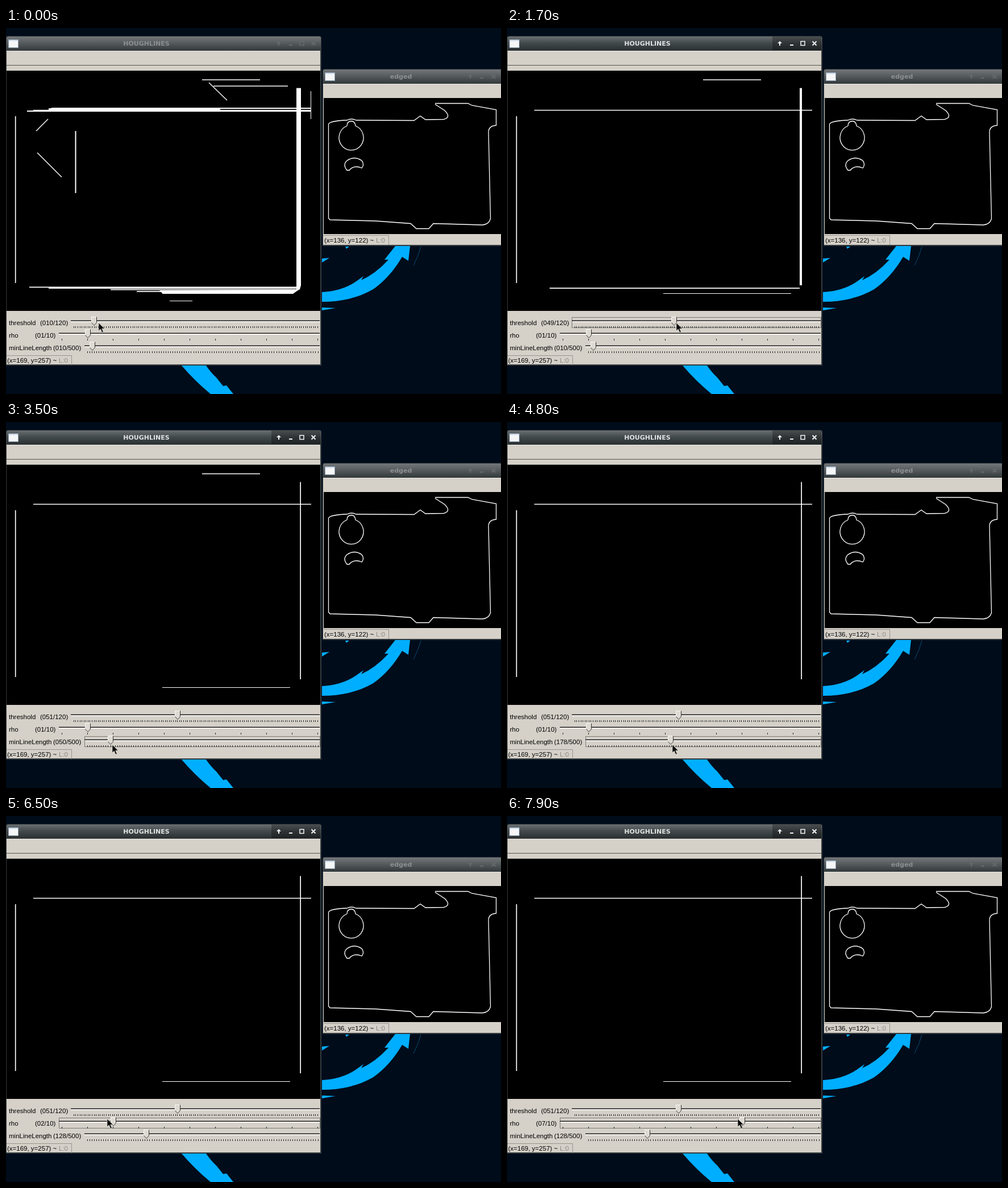
Animation of 871 by 643 pixels, one loop 8000 ms. Source, as an HTML page with a canvas:

```html
<!DOCTYPE html>
<html lang="en">
<head>
<meta charset="utf-8">
<title>Hough lines tuning</title>
<style>
html, body { margin: 0; width: 871px; height: 643px; overflow: hidden; background: #010c1b; }
canvas { display: block; }
</style>
</head>
<body>
<canvas id="stage" width="871" height="643"></canvas>
<script>
const ctx = document.getElementById('stage').getContext('2d');
const PANEL = '#d5d0c8', BLUE = '#00aeff';
const LABEL = '11.5px "Liberation Sans", Arial, sans-serif';
const TITLE = 'bold 11px "DejaVu Sans", sans-serif';

const clamp = (v, lo, hi) => Math.min(hi, Math.max(lo, v));
const mix = (a, b, u) => a + (b - a) * u;

function rect(x, y, w, h, color) {
  ctx.fillStyle = color;
  ctx.fillRect(x, y, w, h);
}
function text(str, x, y, color = '#000', font = LABEL, align = 'left') {
  ctx.font = font;
  ctx.textAlign = align;
  ctx.fillStyle = color;
  ctx.fillText(str, x, y);
}
function shape(d, fill, stroke, width = 1) {
  const p = new Path2D(d);
  if (fill) { ctx.fillStyle = fill; ctx.fill(p); }
  if (stroke) { ctx.strokeStyle = stroke; ctx.lineWidth = width; ctx.stroke(p); }
}

// Times are in steps of 100 ms. Each bar is dragged from `start` along its keys [step, value];
// the pointer glides to it during `reach` and holds it at `grip` from the handle.
const BARS = [
  { name: 'threshold', max: 120, digits: 3, y: 514, left: 114, zero: 119.2, unit: 3.577, tick: 1, textX: 60,
    start: 6, reach: [0, 1], grip: [4, 4], keys: [[6.5, 10], [17, 49], [19, 51]] },
  { name: 'minLineLength', max: 500, digits: 3, y: 558, left: 138, zero: 143.4, unit: 0.811, tick: 5, textX: 83,
    start: 32, reach: [27, 29], grip: [3, 9], keys: [[32, 10], [39, 103], [40, 103], [44, 178], [48, 178], [51, 128]] },
  { name: 'rho', max: 10, digits: 2, y: 536, left: 93, zero: 98.5, unit: 45, tick: 1, textX: 51,
    start: 62, reach: [53, 58], grip: [-8, -4], keys: [[62, 1.2], [65, 1.95], [77, 7]] }
];

function valueAt({ keys }, s) {
  let a = keys[0];
  for (const b of keys) {
    if (s < b[0]) return mix(a[1], b[1], clamp((s - a[0]) / (b[0] - a[0]), 0, 1));
    a = b;
  }
  return a[1];
}
const handleX = (bar, value) => Math.round(bar.zero + value * bar.unit);
const activeBar = s => BARS.findLast(bar => s >= bar.start);

function pointer(s) {
  let x = 163, y = 518;
  for (const bar of BARS) {
    const [from, to] = bar.reach;
    const u = clamp((s - from) / (to - from), 0, 1);
    x = mix(x, handleX(bar, valueAt(bar, s)) + bar.grip[0], u);
    y = mix(y, bar.y + bar.grip[1], u);
  }
  return [Math.round(x), Math.round(y)];
}

function houghLines(th, min, rho) {
  // a line shows when it has enough votes and is long enough
  const line = (x1, y1, x2, y2, votes = 99, width = 1.7) => {
    if (votes >= th && Math.hypot(x2 - x1, y2 - y1) * 0.73 >= min)
      shape(`M${x1} ${y1}L${x2} ${y2}`, null, '#fff', width);
  };
  line(345, 91, 447, 91);
  line(365, 102, 496, 102, 14);
  line(357, 96, 389, 127, 12, 1.4);
  line(53, 181, 74, 160, 12, 1.4);
  line(55, 219, 98, 262, 12, 1.4);
  line(122.5, 181, 122.5, 290, 14, 2);

  line(48, 144.5, 537, 144.5);
  line(37, 146, 537, 146, 43, 2);
  line(75, 142.5, 377, 142.5, 16, 3);
  line(80, 141, 537, 141, 16, 2);
  line(16.7, 155, 16.7, 448);
  line(536.5, 111, 536.5, 160, 27, 1);

  const band = th > 50 ? 1.7 : clamp(18 - th, 4, 8);
  line(519 - band / 2, 105.5, 519 - band / 2, 452, 99, band);

  const starts = [41, 75, 184, 230, 275], votes = [33, 50, 30, 26, 99];
  starts.forEach((x, k) => {
    const y = 455.3 + 1.6 * k + 0.3 * k * k;
    line(x, y, 516 - k * k, y, votes[k], k === 4 ? 1 : 1.7);
  });
  line(288, 479.5, 328, 479.5, 30, 1);
  if (th < 13) shape('M270 461L511 460V452H519L517 459 512 462 505 467H276Z', '#fff');

  // coarse rho: one sloping line broken into steps
  if (rho >= 6) {
    const left = rho === 6 ? 17 : 30;
    for (let k = 0; k < 8; k++) {
      const x = left + Math.max(0, 44.4 * k - 22), y = left / 6.5 + 449 + 1.65 * k;
      line(x, y, Math.min(left + 44.4 * k + 22, left + 311), y, 99, 1.7);
    }
  }
}

function wallpaper() {
  rect(0, 0, 871, 643, '#010c1b');
  shape('M556 464Q591 462 615 446L629 436 625 443Q650 432 673 407H666L685 383H711L708 409 697 402Q676 438 646 459 608 481 556 481Z', BLUE);
  shape('M556 405L569 404 556 412ZM556 491L580 492 556 496ZM597 384H604L599 388Z', BLUE);
  shape('M309 593H352Q361 606 370 614L382 629 388 628 400 643H360Q332 620 309 593Z', BLUE);
  shape('M730 384Q726 400 717 417', null, '#064b70');
}

// Window buttons: up arrow, minimise, maximise, close
function buttons([up, low, max, close], y, color) {
  shape(`M${up} ${y - 4}l4 4h-3v4h-2v-4h-3z`, color);
  rect(low - 3, y + 2, 6, 2, color);
  if (max) shape(`M${max - 3.5} ${y - 3.5}h7v7h-7z`, null, color, 1.5);
  shape(`M${close - 3.5} ${y - 3.5}l7 7m0 -7l-7 7`, null, color, 2);
}
function windowFrame(x, y, w, h, name, titleX, active) {
  shape(`M${x} ${y + h}V${y + 4}q0 -4 4 -4h${w - 8}q4 0 4 4v${h - 4}z`, '#353c3e');
  const g = ctx.createLinearGradient(0, y, 0, y + 25);
  const stops = active ? ['#6d7274', '#434a4c', '#2b3133'] : ['#75797b', '#565b5d', '#353b3d'];
  stops.forEach((c, i) => g.addColorStop(i / 2, c));
  shape(`M${x + 1} ${y + 25}v-21q0 -3 3 -3h${w - 8}q3 0 3 3v21z`, g);
  rect(x + 4, y + 6, 18, 15, '#8fa0b2');
  rect(x + 5, y + 7, 16, 13, '#f5f6f7');
  rect(x + 5, y + 7, 16, 2, '#d5e0ee');
  text(name, titleX, y + 17, active ? '#e0e2e2' : '#8c9092', TITLE, 'center');
  rect(x + 1, y + 26, w - 3, h - 28, PANEL);
  rect(x + 1, y + 26, w - 3, 1, '#eeebe6');
}
function status(x, y, coords) {
  rect(x, y, 114, 1, '#99958f');
  rect(x + 114, y, 1, 17, '#99958f');
  text(coords, x + 1, y + 13);
  text('L:0', x + 92, y + 13, '#8f8b86');
}

function slider(bar, value, focused) {
  const { name, max, digits, y, left, zero, unit, tick, textX } = bar;
  text(name, 5, y + 8);
  text(`(${String(value).padStart(digits, '0')}/${max})`, textX, y + 8);
  rect(left, y - 1, 552 - left, 1, '#8b8781');
  rect(left, y, 552 - left, 1, '#111');
  rect(left, y + 1, 552 - left, 2, '#f5f3f0');
  for (let v = 0; v <= max; v += tick) rect(Math.round(zero + v * unit - 0.4), y + 10, 1, 3, '#222');
  if (focused) {
    ctx.setLineDash([1, 1]);
    shape(`M${left}.5 ${y - 5.5}H552.5V${y + 12.5}H${left}.5Z`, null, '#222');
    ctx.setLineDash([]);
  }
  const x = handleX(bar, value);
  shape(`M${x - 4.5} ${y - 6.5}h9v10l-4.5 5 -4.5 -5z`, '#dedad3', '#f8f7f4');
  shape(`M${x + 4.5} ${y - 6.5}v10l-4.5 5 -4.5 -5`, null, '#33312e');
}

function edgedWindow() {
  windowFrame(557, 72, 316, 311, 'edged', 695, false);
  buttons([817, 837, 0, 858], 85, '#656a6c');
  rect(559, 123, 312, 239, '#000');
  status(559, 364, '(x=136, y=122) ~');
  const outline = 'M755 132.5H813L820 136 862.5 143.5V171Q849 172 849 183L852.5 335Q850 345 838 346L752 343.5 744 352.5H722L712 343.5 650 339 570 337 567.5 334V169Q570 163 600 162 608 158 616 162L718 162.5 729 154.5 738 161 770 160.5Q784 157 772 145L755 134';
  const head = 'M600 172A21.5 22 0 1 0 615 172Q614 163.5 607.5 163.5 600 164 600 172';
  const mouth = 'M600 250Q592 240 600 233 613 224 626 233 631 240 626 246 612 240 604 250Z';
  shape(outline + head + mouth, null, '#fff', 1.3);
}

function houghWindow(s) {
  const focus = activeBar(s);
  const values = BARS.map(bar => Math.round(valueAt(bar, s)));
  windowFrame(0, 14, 555, 579, 'HOUGHLINES', 247, focus);
  if (focus) rect(467, 15, 86, 24, 'rgba(0, 0, 0, 0.3)');
  buttons([480, 501, 520.5, 541], 27, focus ? '#f4f5f5' : '#656a6c');
  rect(1, 65, 552, 1, '#55524e');
  rect(1, 75, 552, 422, '#000');
  houghLines(...values);
  BARS.forEach((bar, i) => slider(bar, values[i], bar === focus));
  status(1, 575, '(x=169, y=257) ~');
}

function frame(now) {
  const s = Math.floor(now % 8000 / 100);
  wallpaper();
  edgedWindow();
  houghWindow(s);
  const [x, y] = pointer(s);
  shape(`M${x} ${y}v14l3.3 -3 2.6 6 2.4 -1 -2.5 -5.8h4.5z`, '#0a0a0a', '#f0eeea', 0.6);
  requestAnimationFrame(frame);
}
frame(performance.now());
</script>
</body>
</html>
```
